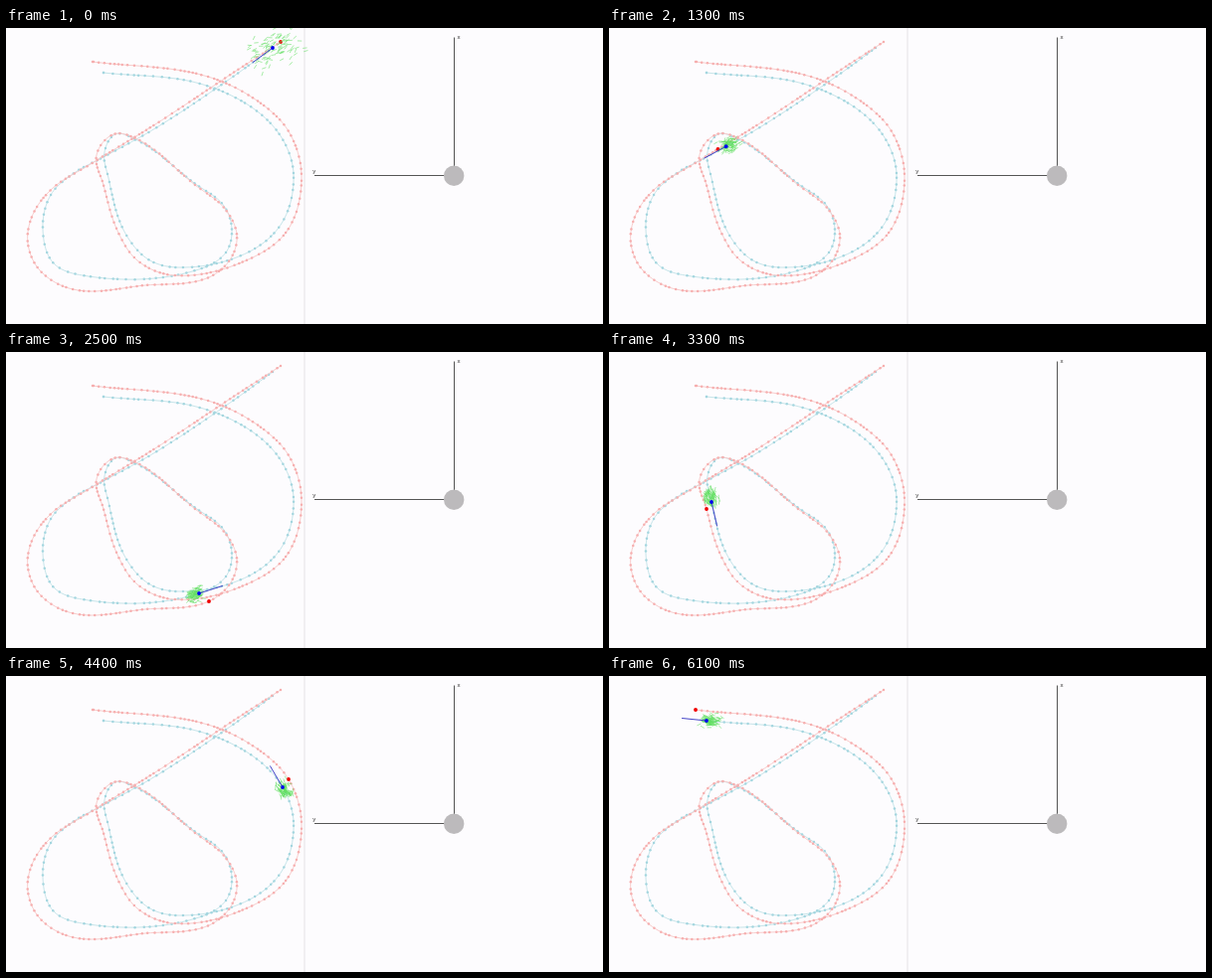
An HTML page with a canvas that plays this animation: 600 by 298 pixels, repeating every 6200 ms.

```html
<!DOCTYPE html>
<html lang="en">
<head>
<meta charset="utf-8">
<title>Particle filter tracking</title>
<style>
  html, body { margin: 0; width: 100%; height: 100%; overflow: hidden; background: #fdfcfe; }
  canvas { display: block; width: 600px; height: 298px; }
</style>
</head>
<body>
<canvas id="stage"></canvas>
<script>
const LOOP = 6200, STEP = 100, DEPART = 560, ARRIVE = 5020, PARTICLES = 110;

// Bends of each route as [x, y]; a third value is the time of passing, in ms.
const truth = buildTrack([
  [276, 14], [230, 44, 800], [150, 97], [85, 137, 1400], [45, 163], [26, 190],
  [22, 217, 1700], [34, 244], [67, 263, 2100], [140, 259], [204, 251, 2500],
  [226, 232], [232, 208], [220, 182], [190, 158, 2800], [128, 110], [108, 107],
  [91, 128], [98, 158, 3300], [112, 204], [132, 234], [168, 249], [250, 230],
  [284, 202], [297, 148], [284, 104, 4400], [255, 75], [203, 49], [87, 34]
]);
const guess = buildTrack([
  [268, 20], [231, 47, 800], [150, 101], [94, 132, 1400], [70, 145], [45, 168],
  [37, 203, 1700], [48, 237], [83, 250, 2100], [194, 243, 2500], [221, 226],
  [227, 203], [219, 179], [189, 156, 2800], [128, 111], [110, 107], [99, 125],
  [103, 151, 3300], [119, 205], [143, 233], [172, 241], [245, 225], [278, 195],
  [289, 147], [278, 112, 4400], [250, 82], [195, 56], [98, 45]
]);

function seeded(seed) {
  let a = seed | 0;
  return () => {
    a = a + 0x6D2B79F5 | 0;
    let t = Math.imul(a ^ a >>> 15, 1 | a);
    t = t + Math.imul(t ^ t >>> 7, 61 | t) ^ t;
    return ((t ^ t >>> 14) >>> 0) / 4294967296;
  };
}

// Roughly normal, unit deviation.
function bell(rnd) {
  return 2 * (rnd() + rnd() + rnd()) - 3;
}

// Piecewise linear lookup; rows start with the key.
function lookup(rows, key, col) {
  if (key <= rows[0][0]) return rows[0][col];
  const i = rows.findIndex(row => key <= row[0]);
  if (i < 0) return rows[rows.length - 1][col];
  const a = rows[i - 1], b = rows[i];
  return a[col] + (b[col] - a[col]) * (key - a[0]) / (b[0] - a[0]);
}

function hermite(p, q, m, n, u) {
  const w = 1 - u;
  return w * w * (1 + 2 * u) * p + u * u * (3 - 2 * u) * q + u * w * (w * m - u * n);
}

// Smooth curve whose tangent halves the turn at every bend.
function buildTrack(points) {
  const legs = points.slice(1).map((p, i) => Math.atan2(p[1] - points[i][1], p[0] - points[i][0]));
  const tangent = i => {
    const a = legs[Math.max(0, i - 1)], b = legs[Math.min(legs.length - 1, i)];
    const angle = Math.atan2(Math.sin(a) + Math.sin(b), Math.cos(a) + Math.cos(b));
    return [Math.cos(angle), Math.sin(angle)];
  };
  const samples = [[0, ...points[0]]], timing = [[DEPART, 0]];
  let length = 0;
  legs.forEach((_, i) => {
    const p = points[i], q = points[i + 1], m = tangent(i), n = tangent(i + 1);
    const chord = Math.hypot(q[0] - p[0], q[1] - p[1]);
    for (let k = 1; k <= 12; k++) {
      const [x, y] = [0, 1].map(c => hermite(p[c], q[c], m[c] * chord, n[c] * chord, k / 12));
      const [, lastX, lastY] = samples[samples.length - 1];
      length += Math.hypot(x - lastX, y - lastY);
      samples.push([length, x, y]);
    }
    if (q[2]) timing.push([q[2], length]);
  });
  timing.push([ARRIVE, length]);
  return {
    samples, length,
    point: s => [lookup(samples, s, 1), lookup(samples, s, 2)],
    distance: t => lookup(timing, t, 1)
  };
}

const scale = window.devicePixelRatio || 1;

function layer(canvas) {
  canvas.width = 600 * scale;
  canvas.height = 298 * scale;
  const c = canvas.getContext("2d");
  c.scale(scale, scale);
  return c;
}

function dot(c, [x, y], r, color) {
  c.fillStyle = color;
  c.beginPath();
  c.arc(x, y, r, 0, 2 * Math.PI);
  c.fill();
}

function line(c, x1, y1, x2, y2, color) {
  c.strokeStyle = color;
  c.lineWidth = 1;
  c.beginPath();
  c.moveTo(x1, y1);
  c.lineTo(x2, y2);
  c.stroke();
}

function drawTrail(c, track, lineColor, dotColor, gap) {
  const rnd = seeded(gap * 100);
  c.strokeStyle = lineColor;
  c.lineWidth = 1;
  c.beginPath();
  track.samples.forEach(([, x, y]) => c.lineTo(x, y));
  c.stroke();
  for (let s = 0; s < track.length; s += gap * (0.6 + 0.8 * rnd()))
    dot(c, track.point(s), 1.25, dotColor);
  dot(c, track.point(track.length), 1.25, dotColor);
}

const backdrop = document.createElement("canvas");
function drawBackdrop() {
  const c = layer(backdrop);
  c.fillStyle = "#fdfcfe";
  c.fillRect(0, 0, 600, 298);
  drawTrail(c, guess, "#c6e5ea", "#a4d6df", 7);
  drawTrail(c, truth, "#f9cccc", "#f6afaf", 5.8);
  line(c, 300, 0, 300, 298, "#e4e2e5");
  line(c, 450.5, 9.5, 450.5, 149, "#555");
  line(c, 310, 148.5, 450, 148.5, "#555");
  dot(c, [450.2, 148.8], 10.2, "#bcbabc");
  c.fillStyle = "#333";
  c.font = "6px 'Liberation Sans', Arial, sans-serif";
  c.fillText("x", 453.5, 11);
  c.fillText("y", 308.2, 146);
}

function drawParticles(c, t, x, y, angle) {
  const rnd = seeded(t + 7);
  // Wide at first, tight once settled, wide again in the left bend.
  const spread = 4.4 + 8 * Math.exp(-t / 200) + 4 * Math.exp(-(((t - 1700) / 250) ** 2));
  const cos = Math.cos(angle), sin = Math.sin(angle);
  c.strokeStyle = "rgba(100, 222, 100, 0.8)";
  c.lineWidth = 0.7;
  c.beginPath();
  for (let i = 0; i < PARTICLES; i++) {
    const u = bell(rnd) * spread - 4, v = bell(rnd) * spread * 0.75;
    const px = x + u * cos - v * sin, py = y + u * sin + v * cos;
    const a = angle + bell(rnd) * 0.4;
    const dx = 2.2 * Math.cos(a), dy = 2.2 * Math.sin(a);
    c.moveTo(px - dx, py - dy);
    c.lineTo(px + dx, py + dy);
  }
  c.stroke();
}

const ctx = layer(document.getElementById("stage"));
function render(t) {
  const s = guess.distance(t);
  const [x, y] = guess.point(s);
  const [ax, ay] = guess.point(s - 3), [bx, by] = guess.point(s + 3);
  const angle = Math.atan2(by - ay, bx - ax);
  ctx.drawImage(backdrop, 0, 0, 600, 298);
  dot(ctx, truth.point(truth.distance(t)), 1.9, "#f00000");
  drawParticles(ctx, t, x, y, angle);
  line(ctx, x, y, x + 25 * Math.cos(angle), y + 25 * Math.sin(angle), "#4444c8");
  dot(ctx, [x, y], 1.9, "#0000f0");
}

drawBackdrop();
let shown = -1;
const start = performance.now();
function tick() {
  const t = Math.floor((performance.now() - start) % LOOP / STEP) * STEP;
  if (t !== shown) render(shown = t);
  requestAnimationFrame(tick);
}
tick();
</script>
</body>
</html>
```
